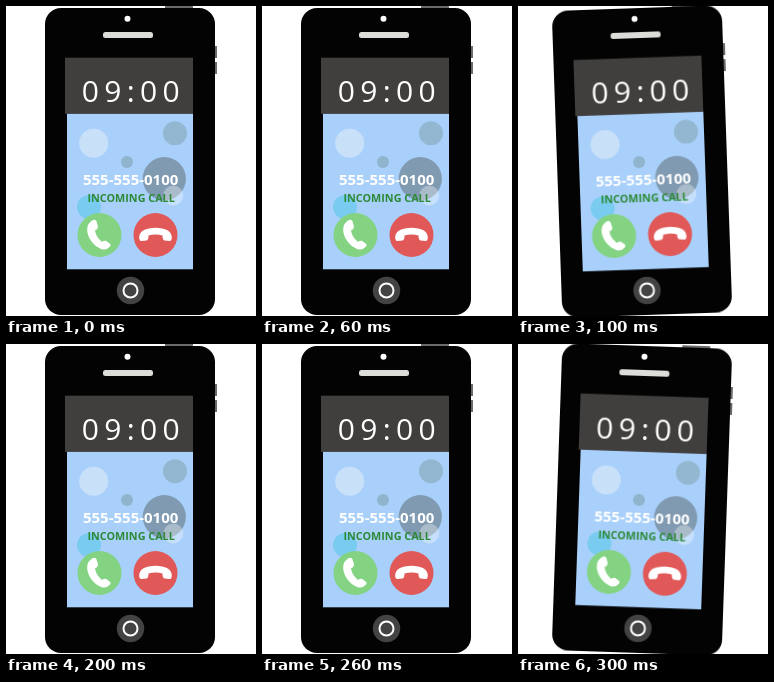
Animation, 250 px wide and 310 px high, one loop 400 ms. Source, as an HTML page:

```html
<!DOCTYPE html>
<html lang="en">
<head>
<meta charset="utf-8">
<title>Incoming call</title>
<style>
  html, body { margin: 0; width: 100%; height: 100%; overflow: hidden; background: #fff; }
  svg { display: block; width: 250px; height: 310px; }
  text { font-family: "Open Sans", "Noto Sans", sans-serif; }
  .phone { transform-origin: 125px 155px; animation: ring 400ms step-end infinite; }
  .clock { font-size: 30px; letter-spacing: 5.3px; fill: #fff; }
  .number { font-size: 15px; font-weight: 700; fill: #fff; }
  .status { font-size: 10.8px; font-weight: 700; fill: #2c8a38; }
  @keyframes ring {
    0%, 50% { transform: rotate(0deg); }
    25% { transform: rotate(-2deg); }
    75% { transform: rotate(2deg); }
    100% { transform: rotate(0deg); }
  }
</style>
</head>
<body>
<svg viewBox="0 0 250 310">
  <g class="phone">
    <!-- side buttons and body -->
    <g fill="#6a6a6a">
      <rect x="159" y="0" width="28" height="4"/>
      <rect x="207" y="40" width="4" height="12"/>
      <rect x="207" y="56" width="4" height="12"/>
    </g>
    <rect x="39" y="2" width="170" height="307" rx="16" fill="#030303"/>
    <circle cx="121.5" cy="12.7" r="3" fill="#fff"/>
    <rect x="97" y="26" width="50" height="6" rx="2.5" fill="#dcddd9"/>

    <!-- screen -->
    <rect x="61" y="107" width="126" height="156.3" fill="#a9d0fb"/>
    <rect x="59" y="51.7" width="128" height="56.2" fill="#413f3e"/>
    <circle cx="87.7" cy="137.3" r="14.5" fill="#c9e0f9"/>
    <circle cx="169" cy="127.3" r="12" fill="#93b7d0"/>
    <circle cx="121" cy="156" r="6" fill="#8fb4cc"/>
    <circle cx="158.3" cy="172.7" r="21.6" fill="#809ab1"/>
    <circle cx="167.3" cy="189.5" r="10" fill="#fff" fill-opacity=".33"/>
    <circle cx="83" cy="201" r="12" fill="#7acbf0"/>

    <text class="clock" x="75.8" y="95.5">09:00</text>
    <text class="number" x="77" y="178.5">555-555-0100</text>
    <text class="status" x="81.5" y="196.4">INCOMING CALL</text>

    <!-- answer and decline -->
    <circle cx="93.5" cy="229" r="22" fill="#83d383"/>
    <circle cx="149.5" cy="229" r="22" fill="#e15858"/>
    <g fill="#fff">
      <path d="M82 219Q84 215 88 213.8Q90 213.6 90.6 215.5L92 220.5Q92.2 222.8 89 224.5Q90 231 96 236Q98 234 100.3 235L104 237.8Q105.2 239 104 240.5Q101 244 97 243.5C87 241 78.5 228 82 219Z"/>
      <path d="M133.2 232.5C132.5 225 140 221.7 149.5 221.7S166.500 225 165.800 232.500Q165.500 235 163.500 235L158.500 234.500Q156.500 234 156.500 229.500Q149.500 227.500 142.500 229.500Q142.500 234 140.500 234.500L135.500 235Q133.500 235 133.200 232.500Z"/>
    </g>

    <!-- home button -->
    <circle cx="124.500" cy="284.500" r="13.700" fill="#434343"/>
    <circle cx="124.500" cy="284.500" r="7" fill="none" stroke="#fff" stroke-width="2"/>
  </g>
</svg>
</body>
</html>
```
